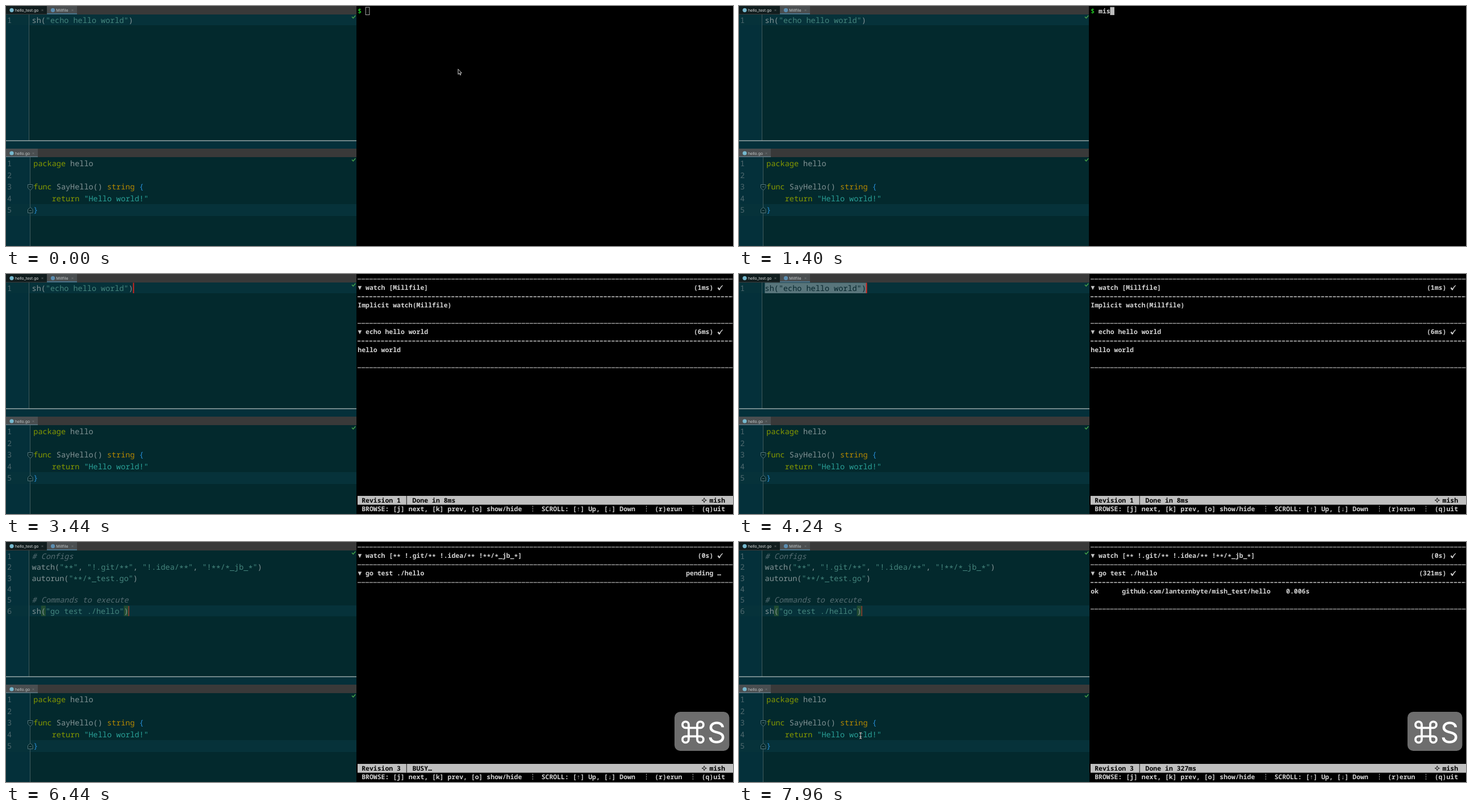
These frames come from a looping animation (1280x424 px, 8000 ms). An HTML page:

```html
<!DOCTYPE html>
<html lang="en">
<head>
<meta charset="utf-8">
<title>Editor and terminal</title>
<style>
html, body { margin: 0; width: 100%; height: 100%; overflow: hidden; background: #000; }
svg { display: block; width: 1280px; height: 424px; }
text { white-space: pre; text-rendering: geometricPrecision; }
.code, .term { font-family: "Noto Sans Mono", "DejaVu Sans Mono", monospace; }
.code { font-size: 13.5px; }
.term { font-size: 11.47px; font-weight: 600; fill: #d4d4d4; }
.tab { font: 6.95px Inter, sans-serif; }
</style>
</head>
<body>
<svg id="stage" viewBox="0 0 1280 424"></svg>
<script>
const LOOP = 8000;
const BASE = '#839496', STR = '#45857d', NOTE = '#566d73', KEY = '#859900',
      TYPE = '#b58900', BRACE = '#268bd2', TEAL = '#2aa198', NUM = '#4f686e';
const CW = 6.88, RH = 15.65, TX = 619.3;

const rect = (x, y, w, h, fill, extra = '') =>
  `<rect x="${x}" y="${y}" width="${w}" height="${h}" fill="${fill}" ${extra}/>`;
const path = (d, stroke, w = 1, extra = '') =>
  `<path d="${d}" fill="none" stroke="${stroke}" stroke-width="${w}" ${extra}/>`;
const group = (id, body, extra = '') => `<g id="${id}" ${extra}>${body}</g>`;

// Asterisks sit at the middle of the line.
const stars = s => s.split(/(\*+)/).map((part, i) =>
  i ? `<tspan dy="${i % 2 ? 0.17 : -0.17}em">${part}</tspan>` : part).join('');

// Code line made of text, colour pairs.
const code = (x, y, ...runs) => {
  let out = '';
  for (let i = 0; i < runs.length; i += 2)
    out += `<tspan fill="${runs[i + 1]}">${stars(runs[i])}</tspan>`;
  return `<text class="code" x="${x}" y="${y}">${out}</text>`;
};
const topY = n => 29.7 + (n - 1) * 19.4;
const lowY = n => 283 + (n - 1) * 20.6;
const topLine = (n, ...runs) => code(45.6, topY(n), ...runs);
const lowLine = (n, ...runs) => code(48.3, lowY(n), ...runs);
const number = (n, y) => code(2, y(n), String(n), NUM);

const tab = (x, y, s, fill) => `<text class="tab" x="${x}" y="${y}" fill="${fill}">${s}</text>`;
const cross = (x, y) =>
  path(`M${x - 1.5} ${y - 1.5}l3 3m0 -3l-3 3`, '#7d8283', .6);
const dot = (x, y, fill) => `<circle cx="${x}" cy="${y}" r="3.6" fill="${fill}"/>`;
const tick = y => path(`M609 ${y}l2.3 2.4l4 -4.6`, '#47a34a', 1.5);

// Terminal helpers work in columns and rows.
const colX = c => TX + c * CW;
const rowY = r => 8.5 + r * RH;
const term = (c, r, s, fill = '') =>
  `<text class="term" x="${colX(c)}" y="${rowY(r) + 4}" ${fill && `style="fill:${fill}"`}>${stars(s)}</text>`;
const rule = (r, dashed) => path(`M619 ${rowY(r) + .4}H1280`, dashed ? '#c8c8c8' : '#989898', 1.5,
  `stroke-dasharray="${dashed ? '5.3 1.58' : '6.2 .68'}"`);
const check = r => {
  const y = rowY(r);
  return `<path d="M1252.6 ${y + .6}l2 -1.2l1.5 2.4q2.2 -4.4 5.4 -6.2l.8 .6q-3.4 3.2 -5.6 8.2h-1.6z" fill="#d4d4d4"/>`;
};
const section = (r, title, time, c, done = true) =>
  `<path d="M619.6 ${rowY(r) - 3}h6.6l-3.3 7z" fill="#c4c4c4"/>` +
  term(2, r, title) + term(c, r, time) + (done ? check(r) : '');
const bar = (id, revision, state) =>
  group(id, term(1, 25, 'Revision ' + revision, '#000') + term(14, 25, state, '#000'));

function editor() {
  const string = ['sh(', BASE, '"echo hello world"', STR, ')', BASE];
  const glob = s => [s, STR];
  return group('left',
    rect(0, 0, 617, 424, '#03292d') +
    rect(0, 15, 40, 223, '#04303a') + rect(0, 267, 42, 157, '#04303a') +
    rect(0, 239, 617, 13, '#04303a') +
    // upper pane
    rect(0, 0, 617, 15, '#393939') + rect(0, 0, 72, 14, '#111d1e') +
    rect(72, 0, 53, 14, '#4a4e50') + rect(72, 13, 53, 1.6, '#4a7d99') +
    dot(10, 7.3, '#76b9cf') + tab(16, 9.8, 'hello_test.go', '#e0e4e4') + cross(64, 7.5) +
    dot(82.5, 7.3, '#5b8db0') + tab(88.3, 9.8, 'Millfile', '#c3c9ca') + cross(117, 7.5) +
    group('short',
      rect(0, 15, 617, 19, '#06323a') + number(1, topY) +
      group('plain', topLine(1, ...string)) +
      group('picked', rect(45.5, 15.5, 178.5, 18.5, '#58757b') +
        topLine(1, 'sh("echo hello world")', '#06252c')) +
      group('caret', rect(223.6, 15.5, 1.8, 18.5, '#e0231d'))) +
    group('long',
      rect(0, 112, 617, 19.3, '#06323a') +
      rect(61.8, 112.5, 8.1, 18.5, '#214c32') + rect(207.6, 112.5, 8.1, 18.5, '#214c32') +
      [1, 2, 3, 4, 5, 6].map(n => number(n, topY)).join('') +
      topLine(1, '', BASE) +
      `<g font-style="italic">${topLine(1, '# Configs', NOTE)}${topLine(5, '# Commands to execute', NOTE)}</g>` +
      topLine(2, 'watch(', BASE, ...glob('"**"'), ', ', BASE, ...glob('"!.git/**"'), ', ', BASE,
        ...glob('"!.idea/**"'), ', ', BASE, ...glob('"!**/*_jb_*"'), ')', BASE) +
      topLine(3, 'autorun(', BASE, ...glob('"**/*_test.go"'), ')', BASE) +
      topLine(6, 'sh(', BASE, '"go test ./hello"', STR, ')', BASE) +
      rect(215.6, 113, 1.3, 18, '#a83a2c')) +
    path('M40.5 15V238', '#405a5e') + tick(19) +
    rect(0, 237.4, 617, 1.2, '#b9c6c6') +
    // lower pane
    rect(0, 252, 617, 15, '#393939') + rect(0, 252, 56, 15, '#4a4e50') +
    rect(0, 265.6, 56, 1.4, '#5f7985') +
    dot(10, 260, '#76b9cf') + tab(16, 262.6, 'hello.go', '#c3c9ca') + cross(48, 260.3) +
    rect(0, 350, 617, 21, '#06323a') +
    [1, 2, 3, 4, 5].map(n => number(n, lowY)).join('') +
    path('M42.5 267V424', '#405a5e') + tick(271.5) +
    path('M38.5 315.5h8.5v6l-4.2 4l-4.3 -4zM41 319.5h3.5', '#57777c', 1, 'style="fill:#03292d"') +
    path('M38.5 365.5h8.5v-6l-4.2 -4l-4.3 4zM41 361.5h3.5', '#57777c', 1, 'style="fill:#03292d"') +
    lowLine(1, 'package', KEY, ' hello', BASE) +
    lowLine(3, 'func', KEY, ' SayHello() ', BASE, 'string', TYPE, ' {', BRACE) +
    lowLine(4, '    return ', KEY, '"Hello world!"', TEAL) +
    lowLine(5, '}', BRACE)) +
    group('edge', rect(616, 0, 1, 424, '#000'));
}

function terminal() {
  const gap = x => path(`M${x} 409.5v11.5`, '#a8a8a8', 1, 'stroke-dasharray="2.4 1.6"');
  return rect(617, 0, 663, 424, '#000') +
    group('shell',
      term(0, 0, '$', '#22c522') +
      `<text id="typed" class="term" x="${colX(2)}" y="${rowY(0) + 4}"></text>` +
      `<rect id="block" width="6.6" height="13.4" stroke="#bdbdbd" stroke-width=".9"/>`) +
    group('app',
      rule(0) +
      group('first',
        section(1, 'watch [Millfile]', '(1ms)', 86) + rule(2, true) +
        term(0, 3, 'Implicit watch(Millfile)') + rule(5) +
        section(6, 'echo hello world', '(6ms)', 86) + rule(7, true) +
        term(0, 8, 'hello world') + rule(10)) +
      group('second',
        section(1, 'watch [** !.git/** !.idea/** !**/*_jb_*]', '(0s)', 87) + rule(2) +
        group('busy', section(3, 'go test ./hello', 'pending …', 84, false) + rule(4)) +
        group('done', section(3, 'go test ./hello', '(321ms)', 84) + rule(4, true) +
          term(0, 5, 'ok') + term(8, 5, 'github.com/lanternbyte/mish_test/hello') +
          term(50, 5, '0.006s') + rule(7))) +
      rect(619, 392, 661, 15.6, '#bfbfbf') +
      bar('bar1', 1, 'Done in 8ms') + bar('bar2', 3, 'BUSY…') + bar('bar3', 3, 'Done in 327ms') +
      path('M705.3 392V407.6', '#111') +
      path('M1229.3 395.6l1.1 3l3 1.1l-3 1.1l-1.1 3l-1.1 -3l-3 -1.1l3 -1.1z', '#000', .9) +
      term(90, 25, 'mish', '#000') +
      term(1, 26, 'BROWSE: [j] next, [k] prev, [o] show/hide') + gap(927.5) +
      term(47, 26, 'SCROLL: [↑] Up, [↓] Down') + gap(1127.5) +
      term(76, 26, '(r)erun') + gap(1209.5) + term(88, 26, '(q)uit'));
}

function overlay() {
  const loop = 'A5.5 5.5 0 1 0 ';
  return group('badge',
    rect(1177, 300, 96.5, 69, '#6d6d6d', 'rx="10"') +
    path(`M-7.5 -13${loop}-13 -7.5H13${loop}7.5 -13V13${loop}13 7.5H-13${loop}-7.5 13Z`,
      '#fff', 3.8, 'transform="translate(1209.5 335.8)"') +
    `<text x="1251" y="354.6" text-anchor="middle" fill="#fff" style="font:51px Inter,sans-serif">S</text>`) +
    group('arrow',
      '<path d="M0 0V9.2L2.1 7.3L3.6 10.6L5 10L3.6 6.8H6.3Z" fill="#000" stroke="#e8e8e8" stroke-width=".9"/>') +
    group('beam', path('M-2 -5.5q2 0 2 1.5V4q0 1.5 -2 1.5M2 -5.5q-2 0 -2 1.5M0 4q0 1.5 2 1.5M-1.4 2h2.8',
      '#000', 2.2) + path('M-2 -5.5q2 0 2 1.5V4q0 1.5 -2 1.5M2 -5.5q-2 0 -2 1.5M0 4q0 1.5 2 1.5M-1.4 2h2.8',
      '#f0f0f0', 1));
}

const stage = document.getElementById('stage');
stage.innerHTML = editor() + terminal() + overlay();

const el = {};
stage.querySelectorAll('[id]').forEach(e => el[e.id] = e);
const show = (id, on) => { el[id].style.display = on ? '' : 'none'; };
const place = (id, x, y) => el[id].setAttribute('transform', `translate(${x} ${y})`);
const ease = (t, a, b) => {
  const p = Math.min(1, Math.max(0, (t - a) / (b - a)));
  return p * p * (3 - 2 * p);
};

const KEYS = [880, 1120, 1320, 1520];
const START = 1840, SELECT = 4000, PASTE = 4720, SAVE = 6080, RERUN = 6320, DONE = 6720;

function render(t) {
  const focus = t >= 800 && t < 3400;
  show('edge', focus);

  const app = t >= START, entered = t >= 1720;
  show('shell', !app);
  show('app', app);
  const n = KEYS.filter(k => t >= k).length;
  el.typed.textContent = 'mish'.slice(0, n);
  el.block.setAttribute('x', colX(entered ? 0 : 2 + n) + .2);
  el.block.setAttribute('y', rowY(entered ? 1 : 0) - 6.3);
  el.block.setAttribute('fill', focus ? '#bdbdbd' : 'none');

  const pasted = t >= PASTE;
  show('short', !pasted);
  show('long', pasted);
  show('plain', t < SELECT);
  show('picked', t >= SELECT);
  show('caret', t >= 3400);

  const rerun = t >= RERUN, done = t >= DONE;
  show('first', !rerun);
  show('second', rerun);
  show('busy', !done);
  show('done', done);
  show('bar1', !rerun);
  show('bar2', rerun && !done);
  show('bar3', done);
  show('badge', t >= SAVE);

  show('arrow', t < 880 || (t >= 5120 && t < SAVE));
  if (t < 880) place('arrow', 796, 111.5);
  else place('arrow', 368, 34);
  const k = ease(t, 7280, 7880);
  show('beam', t >= 7280);
  place('beam', 368 - 154 * k, 38 + 304 * k);
}

function frame() {
  render(performance.now() % LOOP);
  requestAnimationFrame(frame);
}
frame();
</script>
</body>
</html>
```
